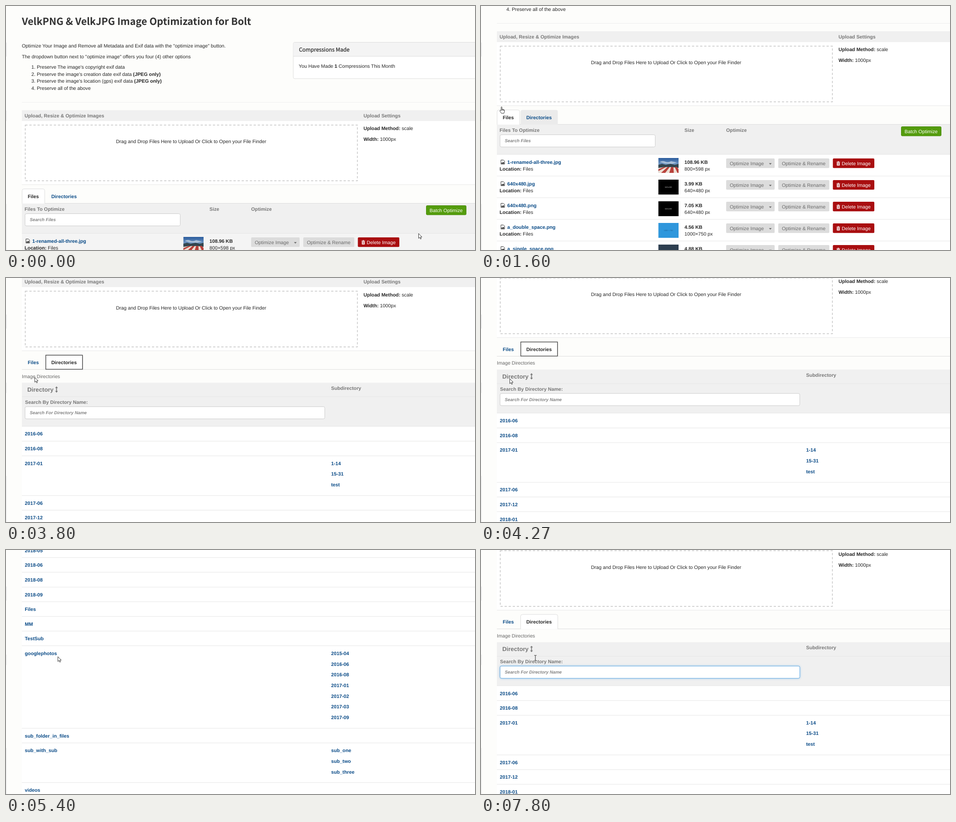
Write an HTML page that moves like this. It is 1035 by 541 pixels and loops after 8000 ms.

```html
<!DOCTYPE html>
<html lang="en">
<head>
<meta charset="utf-8">
<title>Image optimization page</title>
<style>
  html, body { margin: 0; width: 100%; height: 100%; overflow: hidden; background: #fdfdfb; }
  svg { display: block; width: 1035px; height: 541px; }
  text { font: 10.76px "Liberation Sans", Arial, sans-serif; fill: #262626; white-space: pre; text-rendering: geometricPrecision; }
  .b, tspan { font-weight: 700; }
  .h1 { font: 700 21.7px "Noto Sans CJK JP", "Noto Sans CJK SC", "Noto Sans", sans-serif; fill: #333; }
  .h3 { font: 500 11.9px "Noto Sans CJK JP", "Noto Sans CJK SC", "Noto Sans", sans-serif; stroke: #262626; stroke-width: .25px; }
  .gray { font-weight: 700; fill: #777; }
  .big { font-size: 13.2px; }
  .note { fill: #666; }
  .hint { font: italic 700 9.75px "Liberation Sans", Arial, sans-serif; fill: #858585; }
  .link { font-weight: 700; fill: #0a4b87; }
  .off { fill: #6a6a6a; }
  .white { fill: #fff; }
  .mid { text-anchor: middle; }
  .tiny { font-size: 4px; text-anchor: middle; }
</style>
</head>
<body>
<svg viewBox="0 0 1035 541" xmlns="http://www.w3.org/2000/svg">
  <defs>
    <linearGradient id="sky" x2="0" y2="1">
      <stop offset="0" stop-color="#285a9c"/><stop offset=".6" stop-color="#8fb0d2"/>
    </linearGradient>
    <filter id="blur" x="-5%" y="-50%" width="110%" height="200%"><feGaussianBlur stdDeviation="2.5"/></filter>
    <g id="fileIcon" fill="none" stroke="#333">
      <path d="M.5 .5H6L8.5 3V9.5H.5Z"/>
      <path d="M1.5 8.5V7L3 5.5 4.2 6.8 6 4.5 7.5 6.5V8.5Z" fill="#333" stroke="none"/>
    </g>
    <g id="bin" fill="#fff">
      <path d="M0 1.6H2.4L3 .4H5L5.6 1.6H8V2.7H0Z"/>
      <path d="M.8 3.4H7.2V9.2Q7.2 10 6.4 10H1.6Q.8 10 .8 9.2ZM2.3 4.5V8.8H2.9V4.5ZM3.7 4.5V8.8H4.3V4.5ZM5.1 4.5V8.8H5.7V4.5Z" fill-rule="evenodd"/>
    </g>
    <g id="photo">
      <rect width="44.5" height="33" fill="url(#sky)"/>
      <path d="M3 9Q9 5 15 8T28 7L41 10 30 13 14 12Z" fill="#c9d8e6" opacity=".7"/>
      <path d="M0 15L8 13 16 15 27 13 36 15 44.5 13V22H0Z" fill="#33464f"/>
      <path d="M0 22Q20 18 44.5 22V33H0Z" fill="#ecdfd4"/>
      <path d="M0 25L12 20H17L0 29ZM6 33L20 20H25L15 33ZM24 33L28 20H33L34 33ZM42 33L36 20H41L44.5 25V33Z" fill="#b8423c"/>
    </g>
  </defs>
  <g id="page"></g>
  <g fill="#eeeeee"><path d="M0 81H2V112H0ZM0 232H1.5V255H0ZM0 439H1.5V541H0Z"/></g>
  <g id="cursor" stroke-linejoin="round">
    <path id="arrow" d="M.5 .5V11.2L3 8.9 4.7 12.7 6.4 12 4.7 8.2H8Z" fill="#fff" stroke="#222" stroke-width=".9"/>
    <path id="hand" d="M3.4 9V1.7Q3.4 .5 4.4 .5T5.4 1.7V6L7.2 6.2 9 6.7 10.6 7.6V11L9.6 15H4.2L1 10.6Q0 8.6 1.4 8.2 2.4 8 3.4 9ZM5.4 6V8.6M7.2 6.3V8.8M9 6.8V9" fill="#fff" stroke="#222" stroke-width=".9"/>
    <path id="beam" d="M-2.5 .5H-.7L0 1.2 .7 .5H2.5M0 1.2V11.3M-2.5 12H-.7L0 11.3 .7 12H2.5" fill="none" stroke="#222"/>
  </g>
</svg>
<script>
const LOOP = 8000, STEP = 200 / 3;
const $ = id => document.getElementById(id);

// y is the middle of the capital letters
const text = (x, y, s, cls = '', half = 3.9) => `<text x="${x}" y="${y + half}" class="${cls}">${s}</text>`;
const rect = (x, y, w, h, fill, more = '') => `<rect x="${x}" y="${y}" width="${w}" height="${h}" fill="${fill}" ${more}/>`;
const line = (y, color = '#e5e5e5') => rect(35, y - .5, 1000, 1, color);
const input = (x, y, w, hint) =>
  rect(x, y, w, 27, '#fff', 'rx="3" stroke="#ccc"') + text(x + 10.5, y + 13.3, hint, 'hint', 3.5);
const group = (id, inner) => `<g id="${id}">${inner}</g>`;

function intro() {
  const items = ["The image's copyright exif data",
    "the image's creation date exif data <tspan>(JPEG only)</tspan>",
    "the image's location (gps) exif data <tspan>(JPEG only)</tspan>",
    'all of the above'];
  return text(35, 34, 'VelkPNG &amp; VelkJPG Image Optimization for Bolt', 'h1', 8) +
    text(35, 88, 'Optimize Your Image and Remove all Metadata and Exif data with the "optimize image" button.') +
    text(35, 112, 'The dropdown button next to "optimize image" offers you four (4) other options') +
    items.map((s, i) => text(56, 135 + i * 15.6, `${i + 1}. Preserve ${s}`)).join('') +
    rect(634, 80.5, 420, 80.5, '#fff', 'rx="3" stroke="#ddd"') +
    rect(634.5, 81, 420, 30.5, '#f4f4f4', 'rx="2"') + rect(634, 111, 420, 1, '#ddd') +
    text(646.5, 96.5, 'Compressions Made', 'h3', 4.3) +
    text(646, 133, 'You Have Made <tspan>1</tspan> Compressions This Month') +
    line(213.5, '#eee');
}

function upload() {
  return rect(35, 231, 1000, 24, '#f0f0f0') + rect(35, 255, 1000, 141, '#fff') + line(396, '#e8e8e8') +
    text(41, 243, 'Upload, Resize &amp; Optimize Images', 'gray') + text(789, 243, 'Upload Settings', 'gray') +
    rect(42.5, 264, 733, 123.5, 'none', 'stroke="#c4c4c4" stroke-width="1.5" stroke-dasharray="5 4"') +
    text(408.5, 300.5, 'Drag and Drop Files Here to Upload Or Click to Open your File Finder', 'mid') +
    text(789, 271.5, '<tspan>Upload Method:</tspan> scale') + text(789, 295.5, '<tspan>Width:</tspan> 1000px');
}

function tabs() {
  const shape = (x, w) => `<path d="M${x} 438V409.5Q${x} 405.5 ${x + 4} 405.5H${x + w - 4}Q${x + w} 405.5 ${x + w} 409.5V438"`;
  const open = (x, w) => shape(x, w) + ' fill="#fff" stroke="#ddd"/>';
  return line(437.5, '#ddd') + group('filesTab', open(35.5, 50)) + group('dirsTab', open(87.5, 82)) +
    group('hoverTab', shape(87.5, 82) + ' fill="#ebebeb"/>') +
    group('ring', rect(87.8, 405.8, 81, 31.3, '#fff', 'stroke="#444" stroke-width="1.4"')) +
    '<text id="filesName" x="48" y="425.9">Files</text><text id="dirsName" x="100" y="425.9">Directories</text>';
}

const files = [
  ['1-renamed-all-three.jpg', '108.96 KB', '800×598 px'],
  ['640x480.jpg', '3.99 KB', '640×480 px', '#000', '#bbb', '640x480'],
  ['640x480.png', '7.05 KB', '640×480 px', '#000', '#bbb', '640x480'],
  ['a_double_space.png', '4.56 KB', '1000×750 px', '#2f97dc', '#1c5f92', '1000 × 750'],
  ['a_single_space.png', '4.88 KB', '1000×750 px', '#2e3f50', '#8796a4', '1000 × 750']
];

function fileRow([name, size, dims, fill, ink, label], i) {
  const y = 504 + i * 48;
  const button = (x, w, color) => rect(x, y + 9, w, 21.3, color, 'rx="2"');
  const thumb = fill
    ? rect(391.5, y + 8, 44.5, 33, fill) + `<text x="413.5" y="${y + 26}" class="tiny" style="fill:${ink}">${label}</text>`
    : `<use href="#photo" x="391.5" y="${y + 8}"/>`;
  return rect(35, y, 1000, 48, '#fff', `id="file${i}"`) + line(y) +
    `<use href="#fileIcon" x="43.5" y="${y + 12}"/>` + text(58, y + 17, name, 'link') +
    text(41, y + 32.4, '<tspan>Location:</tspan> Files') + thumb +
    text(449, y + 17, size, 'b') + text(449, y + 32.4, dims) +
    button(541, 107, '#dcdcdc') + text(549, y + 20.2, 'Optimize Image', 'off') +
    `<path d="M635.5 ${y + 19.5}h6l-3 3.2z" fill="#666"/>` +
    button(656, 112.7, '#dcdcdc') + text(664, y + 20.2, 'Optimize &amp; Rename', 'off') +
    button(776.5, 91.5, '#a90e10') + `<use href="#bin" x="784.5" y="${y + 14.8}"/>` +
    text(796, y + 20.2, 'Delete Image', 'white');
}

function filesPane() {
  return rect(35, 438, 1000, 66, '#f0f0f0') +
    text(41, 450.5, 'Files To Optimize', 'gray') + text(449, 450.5, 'Size', 'gray') + text(541, 450.5, 'Optimize', 'gray') +
    input(42, 460.5, 342.5, 'Search Files') +
    rect(927.5, 442.5, 88, 20.5, '#549c0d', 'rx="2" stroke="#478a08"') + text(971.3, 453, 'Batch Optimize', 'white mid') +
    files.map(fileRow).join('');
}

const range = (from, to) => Array.from({ length: to - from + 1 }, (_, i) => `2018-0${from + i}`);
const dirs = ['2016-06', '2016-08', '2017-01', '2017-06', '2017-12', ...range(1, 6), ...range(8, 9),
  'Files', 'MM', 'TestSub', 'googlephotos', 'sub_folder_in_files', 'sub_with_sub', 'videos'];
const subs = {
  '2017-01': ['1-14', '15-31', 'test'],
  googlephotos: ['2015-04', '2016-06', '2016-08', '2017-01', '2017-02', '2017-03', '2017-09'],
  sub_with_sub: ['sub_one', 'sub_two', 'sub_three']
};
const rows = [];

function dirsPane() {
  let y = 563.7, out = '';
  dirs.forEach((name, i) => {
    const list = subs[name] || [];
    const h = list.length ? 40.6 + (list.length - 1) * 23.7 : 32.6;
    rows.push({ y, h });
    out += rect(35, y, 1000, h, '#fff', `id="row${i}"`) + line(Math.round(y * 2) / 2) + text(41.5, y + 16.6, name, 'link') +
      list.map((s, k) => text(717.5, y + 16.6 + k * 23.7, s, 'link')).join('');
    y += h;
  });
  return text(35, 452.5, 'Image Directories', 'note') +
    rect(35, 467, 1000, 97, '#f0f0f0') + line(498, '#e6e6e6') +
    text(47, 482, 'Directory', 'gray big', 4.7) +
    '<path d="M111.5 475L114.5 478.7H112.4V485.3H114.5L111.5 489 108.5 485.3H110.6V478.7H108.5Z" fill="#777"/>' +
    text(717.5, 479, 'Subdirectory', 'gray') + text(42, 510, 'Search By Directory Name:', 'gray') +
    group('glow', rect(42, 520, 661.5, 27, '#66afe9', 'rx="3" filter="url(#blur)"')) +
    input(42, 520, 661.5, 'Search For Directory Name') +
    group('focus', rect(42, 520, 661.5, 27, 'none', 'rx="3" stroke="#66afe9"')) +
    group('caret', rect(52, 526.5, 1, 13, '#333')) +
    out + line(y);
}

$('page').innerHTML = intro() + upload() + tabs() + group('files', filesPane()) + group('dirs', dirsPane());

// start, end, from, to
const scrolls = [
  [667, 1533, 0, 175], [3533, 4400, 175, 264.3], [4400, 5267, 264.3, 905],
  [5267, 5867, 905, 949], [6000, 6867, 949, 282.7], [6867, 7067, 282.7, 262.6]
];
// time, x, y
const moves = [
  [0, 910, 504], [533, 38, 329], [667, 38, 329], [1400, 41, 223], [1600, 41, 223], [1870, 24, 213],
  [2200, 63, 219], [3600, 63, 219], [4267, 63, 223], [4467, 63, 223], [5267, 114, 236],
  [5867, 114, 236], [6267, 113, 232], [7200, 113, 232], [7333, 120, 233]
];
const clamp = v => Math.max(0, Math.min(1, v));
const show = (id, on) => { $(id).style.display = on ? '' : 'none'; };
const shade = (id, on) => $(id).setAttribute('fill', on ? '#f4f4f4' : '#fff');

function scrollAt(t) {
  let y = 0;
  for (const [a, b, from, to] of scrolls)
    if (t >= a) y = from + (to - from) * (1 - (1 - clamp((t - a) / (b - a))) ** 3);
  return y;
}

function pointerAt(t) {
  const i = moves.findIndex(m => m[0] > t);
  if (i < 0) return moves[moves.length - 1].slice(1);
  const [a, x, y] = moves[i - 1], [b, X, Y] = moves[i];
  const u = (t - a) / (b - a), e = u * u * (3 - 2 * u);
  return [x + (X - x) * e, y + (Y - y) * e];
}

function draw(time) {
  const t = Math.floor((time + 4) / STEP) * STEP + .01;
  const top = scrollAt(t), [x, y] = pointerAt(t);
  const second = t >= 2800, typing = t >= 7266;
  $('page').setAttribute('transform', `translate(0 ${-top})`);
  $('cursor').setAttribute('transform', `translate(${x} ${y})`);

  const hand = t >= 1400 && !second;
  show('hand', hand);
  show('beam', typing);
  show('arrow', !hand && !typing);

  show('filesTab', !second);
  show('dirsTab', second);
  show('hoverTab', hand);
  show('ring', t >= 3600 && !typing);
  $('filesName').setAttribute('class', second ? 'link' : 'b');
  $('dirsName').setAttribute('class', second ? 'b' : 'link');

  const out = clamp(1 - (t - 2733) / 150), fresh = clamp((t - 2950) / 180);
  show('files', out > 0);
  show('dirs', fresh > 0);
  $('files').style.opacity = out;
  $('dirs').style.opacity = fresh;

  const focus = clamp((t - 7200) / 200);
  $('glow').style.opacity = typing ? focus * .8 : 0;
  $('focus').style.opacity = typing ? focus : 0;
  show('caret', typing && t < 7800);

  shade('file0', t < 300);
  const over = t >= 6200 && t < 6930 ? top + 328 : -1;
  rows.forEach((r, i) => shade('row' + i, over >= r.y && over < r.y + r.h));
}

const begin = performance.now();
function tick() {
  draw((performance.now() - begin) % LOOP);
  requestAnimationFrame(tick);
}
tick();
</script>
</body>
</html>
```
